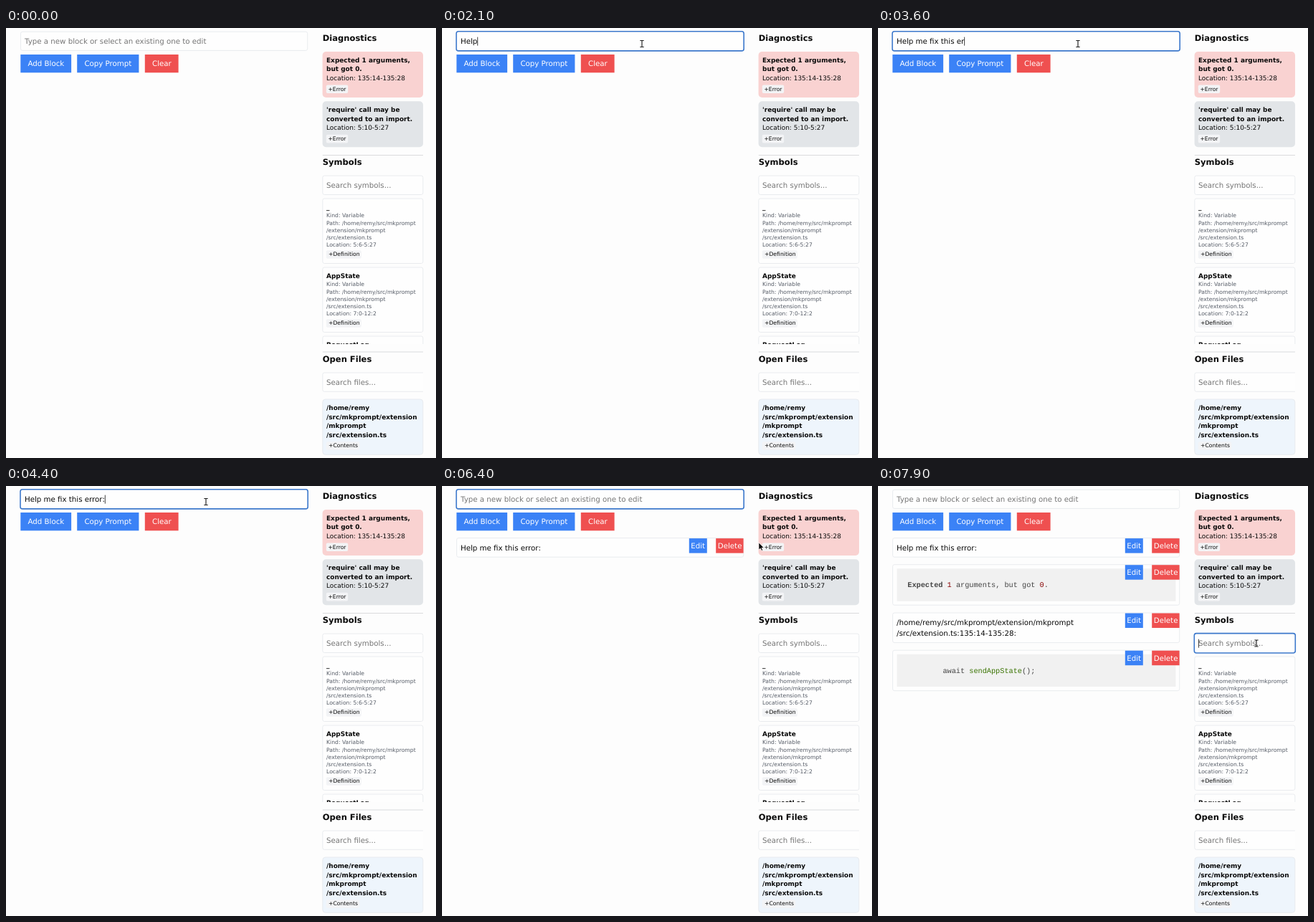
An HTML page that plays this animation: 600x600 px, repeating every 8000 ms.

```html
<!DOCTYPE html>
<html lang="en">
<head>
<meta charset="utf-8">
<title>Prompt builder</title>
<style>
  html, body { margin: 0; width: 100%; height: 100%; overflow: hidden; background: #fdfdfd; }
  svg { display: block; width: 100vw; height: 100vh; }
  text { font-family: "DejaVu Sans", sans-serif; font-size: 10.24px; fill: #0a0a0a; white-space: pre; text-rendering: geometricPrecision; }
  .head { font-size: 11.52px; font-weight: bold; }
  .name { font-size: 8.96px; font-weight: bold; }
  .loc { font-size: 8.96px; }
  .info { font-size: 7.68px; fill: #555b66; }
  .tag { font-size: 7.68px; }
  .hint { fill: #757575; }
  .btn { fill: #fff; }
  .code { font-family: "Liberation Mono", monospace; fill: #444; }
  .num { fill: #800; }
  .fn { fill: #397300; }
  .bold { font-weight: bold; }
</style>
</head>
<body>
<svg viewBox="0 0 600 600">
  <defs>
    <clipPath id="list"><rect x="440" y="236" width="144" height="205"/></clipPath>
  </defs>
  <g id="page"></g>
  <g id="live"></g>
</svg>
<script>
const BLUE = '#3b82f6', RED = '#ef5050', LINE = '#e5e7eb', RING = '#3c78cc';

const text = (x, y, s, cls = '') => `<text x="${x}" y="${y}" class="${cls}">${s}</text>`;
const rect = (x, y, w, h, fill, r = 0, stroke = 'none', sw = 0.8) =>
  `<rect x="${x}" y="${y}" width="${w}" height="${h}" rx="${r}" fill="${fill}" stroke="${stroke}" stroke-width="${sw}"/>`;
const frame = (x, y, w, h) => rect(x, y, w, h, '#fefefe', 2.5, LINE);
const lines = (x, y, step, list, cls) => list.map((s, i) => text(x, y + i * step, s, cls)).join('');
const tag = (y, s, w, x = 450) => rect(446.8, y - 8.2, w, 11.6, '#f3f4f6', 2) + text(x, y, s, 'tag');
const rule = y => rect(441.8, y, 140.2, 1, '#dadbdd');
const caret = (x, y) => rect(x, y - 9.5, 0.8, 12, '#111');

const issue = (y, fill, title, loc) =>
  rect(441.6, y, 140.4, 64, fill, 5) + lines(447, y + 14.6, 12.8, title, 'name') +
  text(447, y + 40.1, 'Location: ' + loc, 'loc') + tag(y + 54.7, '+Error', 30.4, 449.4);

const symbol = (y, name, loc) =>
  frame(441.8, y, 140, 90.5) + text(447, y + 15, name, 'name') +
  lines(447, y + 26.3, 10.24, ['Kind: Variable', 'Path: /home/remy/src/mkprompt',
    '/extension/mkprompt', '/src/extension.ts', 'Location: ' + loc], 'info') +
  tag(y + 80.4, '+Definition', 49);

const button = (x, w, s, fill) => rect(x, 37, w, 25.3, fill) + text(x + 10.2, 53.2, s, 'btn');

document.getElementById('page').innerHTML =
  button(20.3, 70.8, 'Add Block', BLUE) + button(99.2, 86.2, 'Copy Prompt', BLUE) +
  button(193.8, 46.8, 'Clear', RED) +
  text(441.8, 17.6, 'Diagnostics', 'head') +
  issue(33, '#f9d2d1', ['Expected 1 arguments,', 'but got 0.'], '135:14-135:28') +
  issue(102.3, '#e2e5e8', ["'require' call may be", 'converted to an import.'], '5:10-5:27') +
  rule(177) + text(441.8, 190.6, 'Symbols', 'head') +
  '<g clip-path="url(#list)">' + symbol(238, '_', '5:6-5:27') +
  symbol(334, 'AppState', '7:0-12:2') + symbol(430, 'RequestLog', '14:0-18:2') + '</g>' +
  rule(451.5) + text(441.8, 465.5, 'Open Files', 'head') +
  `<path d="M582 481H444.3q-2.5 0-2.5 2.5V504.8q0 2.5 2.5 2.5H582" fill="#fefefe" stroke="${LINE}" stroke-width=".8"/>` +
  text(447, 498, 'Search files...', 'hint') +
  rect(441.8, 518, 140, 77.3, '#eef5fc', 4, LINE) +
  lines(447, 533, 12.7, ['/home/remy', '/src/mkprompt/extension', '/mkprompt', '/src/extension.ts'], 'name') +
  tag(585.4, '+Contents', 46.5);

// Prompt blocks
const block = (y, h, body) =>
  frame(20.5, y, 400.2, h) + body +
  rect(344.8, y + 0.5, 25, 20.5, BLUE) + text(347.3, y + 14.4, 'Edit', 'btn') +
  rect(382.2, y + 0.5, 38.4, 20.5, RED) + text(384.8, y + 14.4, 'Delete', 'btn');
const code = (y, x, s) => block(y, 56.5, rect(26.4, y + 5.6, 389, 45.3, '#f1f1f1') + text(x, y + 31.6, s, 'code'));
const span = (cls, s) => `<tspan class="${cls}">${s}</tspan>`;

const firstBlock = block(72.6, 26.6, text(26, 89.6, 'Help me fix this error:'));
const errorBlocks =
  code(109.7, 41.3, span('bold', 'Expected') + ' ' + span('num', '1') + ' arguments, but got ' + span('num', '0') + '.') +
  block(177, 41.6, lines(26, 193.6, 15.36, ['/home/remy/src/mkprompt/extension/mkprompt', '/src/extension.ts:135:14-135:28:'])) +
  code(229.2, 90.4, 'await ' + span('fn', 'sendAppState') + '();');

// Typing: key times in units of 100 ms
const phrase = 'Help me fix this error:';
const keys = [16, 18, 20, 21, 22, 23, 24, 25, 26, 27, 28, 29, 30, 31, 32, 33, 33, 35, 36, 38, 41, 42, 43];

// Pointer: time, x, y
const path = [[300, 520, 130], [400, 420, 85], [500, 322, 46], [600, 281, 27], [800, 279, 22],
  [6000, 279, 22], [6100, 290, 27], [6400, 442, 79], [6500, 459, 83], [6600, 465, 83.5],
  [7300, 465, 83.5], [7400, 478, 115], [7500, 510, 180], [7600, 528, 219.5]];

function pointerAt(t) {
  const i = path.findIndex(p => p[0] > t);
  if (i < 0) return path[path.length - 1].slice(1);
  const [a, b] = [path[i - 1], path[i]], k = (t - a[0]) / (b[0] - a[0]);
  return [a[1] + (b[1] - a[1]) * k, a[2] + (b[2] - a[2]) * k];
}

const shapes = {
  beam: '<path d="M-2.6-4.5H-.8L0-4 .8-4.5H2.6M0-4V4M-2.6 4.5H-.8L0 4 .8 4.5H2.6" fill="none" stroke="#111" stroke-width="1.1"/>',
  arrow: '<path d="M0 0V10L2.3 8 3.9 11.3 5.6 10.5 4.1 7.3H7.2Z" fill="#000" stroke="#fff" stroke-width=".7"/>',
  hand: '<path d="M0 .8Q.8-.4 1.6.8L3 4 4 3.4 5.2 4 6.3 3.6 7.2 4.3 8.2 4.3 9.8 7 9.4 9.6 5.4 10.4 1.2 7.4Q1 6 2.4 6.4Z" fill="#fff" stroke="#222" stroke-width=".9"/>'
};

function pointer(t) {
  if (t < 300) return '';
  const [x, y] = pointerAt(t);
  const inside = (l, top, r, b) => x > l && x < r && y > top && y < b;
  const kind = inside(20, 5, 421, 32) || inside(442, 206, 582, 233) ? 'beam'
    : inside(447, 79, 477, 91) ? 'hand' : 'arrow';
  return `<g transform="translate(${x} ${y})">${shapes[kind]}</g>`;
}

const field = (x, y, w, h, focus) =>
  focus ? rect(x - 0.5, y - 0.5, w + 1, h + 1, '#fefefe', 3, RING, 1.6) : frame(x, y, w, h);

const live = document.getElementById('live');
const probe = document.createElementNS('http://www.w3.org/2000/svg', 'text');
probe.style.visibility = 'hidden';
live.after(probe);
function widthOf(s) {
  probe.textContent = s;
  return s ? probe.getComputedTextLength() : 0;
}

let last = -1;
function draw(now) {
  const t = Math.floor(now % 8000 / 100) * 100;
  if (t !== last) {
    last = t;
    const typed = t < 5400 ? phrase.slice(0, keys.filter(k => k * 100 <= t).length) : '';
    live.innerHTML =
      field(20.5, 5.2, 400.2, 26.2, t >= 800 && t < 6800) +
      (typed ? text(26, 22.1, typed) : text(26, 22.1, 'Type a new block or select an existing one to edit', 'hint')) +
      (t >= 1500 && t < 5400 ? caret(26 + widthOf(typed), 22.1) : '') +
      field(441.8, 206.1, 140, 26.4, t >= 7800) +
      text(447, 223.2, 'Search symbols...', 'hint') +
      (t >= 7900 ? caret(447, 223.2) : '') +
      (t >= 5400 ? firstBlock : '') + (t >= 7100 ? errorBlocks : '') +
      pointer(t);
  }
  requestAnimationFrame(draw);
}
requestAnimationFrame(draw);
</script>
</body>
</html>
```
